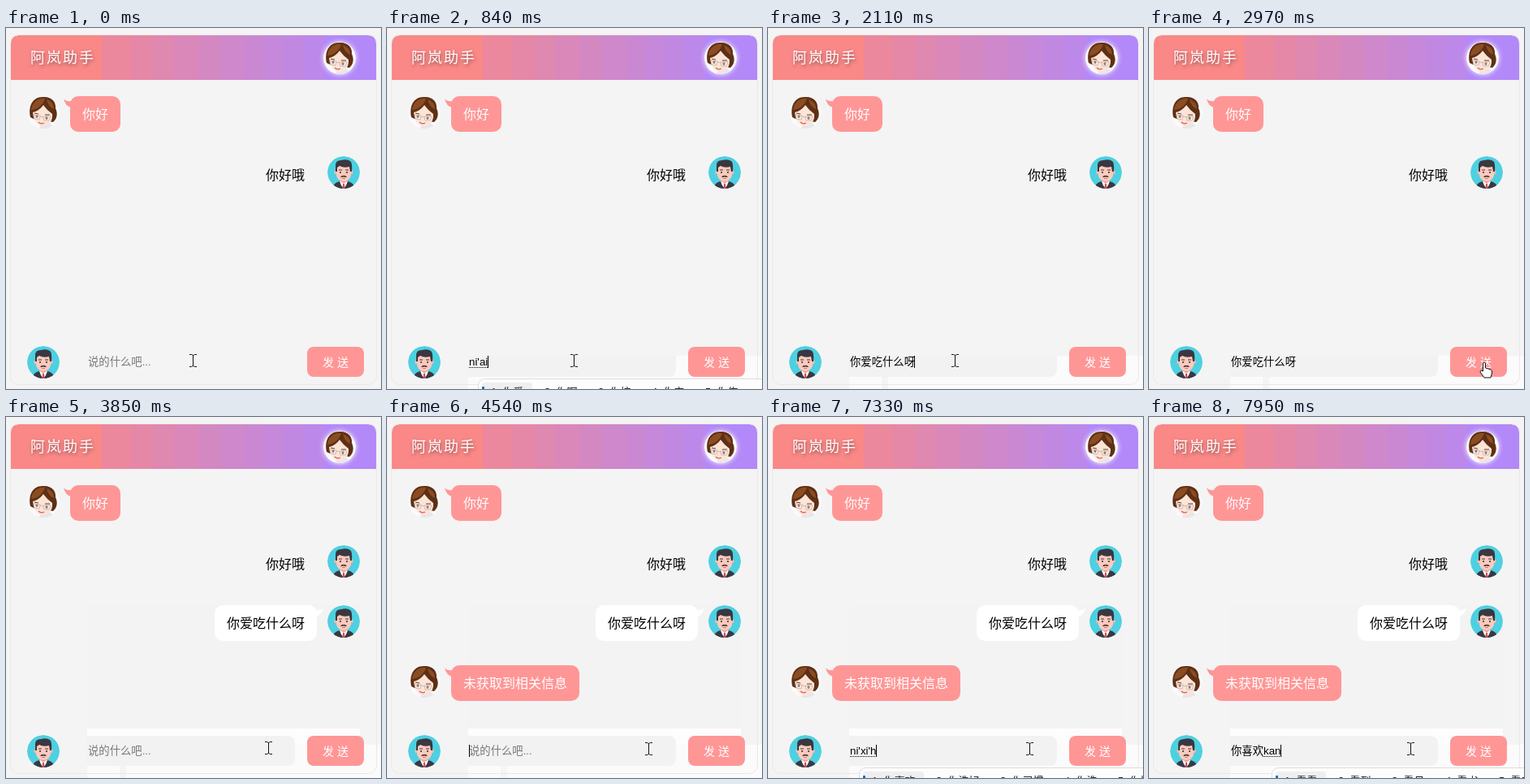
Recreate the animation shown at these times as an HTML page. Size 462 by 445 pixels, loop 8 s.

```html
<!DOCTYPE html>
<html lang="zh-CN">
<head>
<meta charset="utf-8">
<title>聊天</title>
<style>
html, body { margin: 0; width: 100%; height: 100%; overflow: hidden; background: #f4f4f4; }
svg { display: block; width: 462px; height: 445px; }
text { font: 16px "Liberation Sans", "Noto Sans CJK SC", "Noto Sans CJK", sans-serif; white-space: pre; }
.small { font-size: 13.33px; }
.title { font-size: 18px; letter-spacing: 2px; fill: #fff; text-shadow: 1px 2px 4px #0006; }
.glow { filter: drop-shadow(0 0 3px #fff); }
#candidates text { font-size: 13px; fill: #222; }
</style>
</head>
<body>
<svg viewBox="0 0 462 445">
  <defs>
    <clipPath id="round"><circle r="20"/></clipPath>
    <clipPath id="top"><path d="M6 64V19Q6 9 16 9H446Q456 9 456 19V64Z"/></clipPath>
    <g id="woman" clip-path="url(#round)">
      <circle r="20" fill="#fafafa"/>
      <path d="M-6 20L-2 15L8 13L15 20Z" fill="#e6e6ec"/>
      <path d="M-16 6C-19-8-13-19-1-19C10-20 16-13 15-5C18 1 17 8 12 12L7 11L-12 8Z" fill="#5e3015"/>
      <path d="M-13 0Q-5-2 0-9Q5-2 11 2Q12 11 5 15Q1 18-3 17Q-12 13-13 0Z" fill="#fde4d6"/>
      <path d="M-15-3C-14-13-6-18 2-17C-1-8-7-4-15-3ZM4-16Q13-13 13-4Q6-7 4-16Z" fill="#8c4c22"/>
      <path d="M-11 1L-6 2M2 3L8 3" stroke="#6b3a22"/>
      <ellipse cx="-8" cy="5" rx="1.6" ry="2" fill="#4a2c22"/>
      <ellipse cx="4" cy="7" rx="1.6" ry="2" fill="#4a2c22"/>
      <path d="M-12 3L-4 4L-5 9L-11 8ZM0 5L9 5L7 10L1 10ZM-4 5L0 6" fill="#fff6" stroke="#c9b4ae" stroke-width=".9"/>
      <path d="M-6 12Q-3 15 1 13" fill="none" stroke="#d65f62" stroke-width="1.2"/>
    </g>
    <g id="man" clip-path="url(#round)">
      <circle r="20" fill="#4dd0e1"/>
      <path d="M-14 20Q-13 13-5 11H5Q13 13 14 20Z" fill="#3a3843"/>
      <path d="M-5 11H5L3 16L0 20L-3 16Z" fill="#fff"/>
      <path d="M-4 8H4V11L0 14L-4 11Z" fill="#e9a795"/>
      <path d="M-1 14H1L1.5 20H-1.5Z" fill="#c9505a"/>
      <circle cx="-9.5" cy="0" r="2.3" fill="#f4b9aa"/>
      <circle cx="9.5" cy="0" r="2.3" fill="#f4b9aa"/>
      <path d="M-9-8H9V4Q7 11 0 11Q-7 11-9 4Z" fill="#fccabd"/>
      <path d="M-10-1V-9Q-10-15-3-15Q4-17 8-14Q11-12 10-1H8L7-7Q0-5-5-8L-8-6V-1Z" fill="#3a3740"/>
      <path d="M-6-3H-2M2-3H6" stroke="#3a3740"/>
      <circle cx="-4" r="1.1" fill="#3a3740"/><circle cx="4" r="1.1" fill="#3a3740"/>
      <path d="M-4 6Q-2 3 0 4Q2 3 4 6Q2 6 0 5.5Q-2 6-4 6Z" fill="#4a3a40"/>
      <path d="M-2 7.5H2" stroke="#d9776f"/>
    </g>
    <path id="tail" d="M0 3Q3 7 10 6V14Q2 13 0 3Z"/>
  </defs>
  <rect width="462" height="445" fill="#f4f4f4"/>
  <g id="header" clip-path="url(#top)"></g>
  <text class="title" x="30" y="43">阿岚助手</text>
  <use href="#woman" x="411" y="37" class="glow"/>

  <g id="barPatch">
    <path d="M100 404H462V445H100Z" fill="#fbfbfb"/>
    <path d="M100 404H356V420Q356 430 346 430H100Z" fill="#f2f2f2"/>
  </g>
  <path id="strip" d="M140 430H148V445H140Z" fill="#f4f4f4"/>
  <g id="chatPatch">
    <path d="M100 232H436V384H100Z" fill="#f3f3f3"/>
    <path d="M100 384H436V404H100Z" fill="#fdfdfd"/>
    <path d="M100 393H346Q356 393 356 403V405H100Z" fill="#f2f2f2"/>
  </g>
  <rect x="5.5" y="8.5" width="451" height="431" rx="10" fill="none" stroke="#e9e9e9"/>

  <g id="hello"></g>
  <text x="320" y="187">你好哦</text>
  <use href="#man" x="416" y="178"/>
  <g id="question">
    <rect x="257" y="232" width="126" height="44" rx="10" fill="#fff"/>
    <use href="#tail" transform="translate(391 232) scale(-1 1)" fill="#fff"/>
    <text x="272" y="260">你爱吃什么呀</text>
    <use href="#man" x="416" y="252"/>
  </g>
  <g id="reply"></g>

  <use href="#man" x="46" y="412"/>
  <text id="hint" class="small" x="101" y="416" fill="#777">说的什么吧...</text>
  <text id="input" class="small" x="101" y="416"></text>
  <path id="underline" stroke="#000" stroke-dasharray="1 1"/>
  <rect id="caret" y="404" width="1" height="15"/>
  <rect x="371" y="393" width="70" height="37" rx="8" fill="#ff9696"/>
  <text x="390" y="417" fill="#fff" style="font-size:14px;letter-spacing:4px">发送</text>

  <g id="popup">
    <rect x=".5" y="432.5" width="480" height="50" rx="8" fill="#fdfdfd" stroke="#dcdcdc"/>
    <rect id="chosen" x="5" y="437" height="30" rx="4" fill="#efefef"/>
    <rect x="5" y="442" width="3" height="16" rx="1" fill="#0f6cbd"/>
    <g id="candidates"></g>
  </g>
  <path id="beam" fill="none" stroke="#111" d="M-4-7.5H-1.5L.5-6.5L2.5-7.5H5M.5-6.5V6.5M-4 7.5H-1.5L.5 6.5L2.5 7.5H5"/>
  <path id="hand" fill="#fff" stroke="#111" d="M-1.5 1Q0-1 1.5 1V7L8 9Q10 10 9.5 13L8 19H0L-5 12Q-5 9-1.5 11Z"/>
</svg>
<script>
const $ = id => document.getElementById(id);
const LOOP = 8000;

// Header: a banded blend from salmon to violet
const salmon = [249, 136, 135], violet = [179, 136, 248];
const edges = [6, 118, 154, 182, 207, 237, 265, 295, 318, 342, 366, 392, 456];
const middle = i => (edges[i] + edges[i + 1]) / 2;
const lastBand = edges.length - 2;
for (let i = 0; i <= lastBand; i++) {
  const mix = (middle(i) - middle(0)) / (middle(lastBand) - middle(0));
  const rgb = salmon.map((c, k) => Math.round(c + (violet[k] - c) * mix));
  $('header').innerHTML +=
    `<rect x="${edges[i]}" y="9" width="${edges[i + 1] - edges[i]}" height="55" fill="rgb(${rgb})"/>`;
}

function pinkBubble(id, y, words) {
  $(id).innerHTML = `<use href="#woman" x="46" y="${y + 20}"/>
    <rect x="79" y="${y}" width="${30 + 16 * words.length}" height="44" rx="10" fill="#ff9696"/>
    <use href="#tail" x="71" y="${y}" fill="#ff9696"/>
    <text x="94" y="${y + 28}" fill="#fff">${words}</text>`;
}
pinkBubble('hello', 84, '你好');
pinkBubble('reply', 306, '未获取到相关信息');

// Time, committed text, letters being composed
const typing = [
  [0, '', ''], [400, '', 'n'], [460, '', 'ni'], [700, '', "ni'a"], [840, '', "ni'ai"],
  [990, '', "ni'ai'c"], [1050, '', "ni'ai'ch"], [1110, '', "ni'ai'chi"], [1170, '你爱吃', ''],
  [1230, '你爱吃', 's'], [1290, '你爱吃', 'sh'], [1340, '你爱吃', 'she'], [1480, '你爱吃', 'shen'],
  [1600, '你爱吃', "shen'm"], [1740, '你爱吃', "shen'me"], [1920, '你爱吃什么', ''],
  [1980, '你爱吃什么', 'y'], [2050, '你爱吃什么', 'ya'], [2110, '你爱吃什么呀', ''], [3170, '', ''],
  [6700, '', 'n'], [6860, '', 'ni'], [7080, '', "ni'x"], [7140, '', "ni'xi"], [7330, '', "ni'xi'h"],
  [7460, '', "ni'xi'hu"], [7520, '', "ni'xi'hua"], [7580, '', "ni'xi'huan"], [7650, '你喜欢', ''],
  [7830, '你喜欢', 'k'], [7890, '你喜欢', 'ka'], [7950, '你喜欢', 'kan']
];

// Candidate words, picked by the start of the composition
const words = [
  ["ni'xi'h", '你喜欢 你洗好 你习惯 你洗 你惜'], ["ni'x", '你想 你下 你先 你洗 你选'],
  ["ni'ai'", '你爱吃 你爱穿 你爱 你哎 你矮'], ["ni'a", '你爱 你啊 你按 你安 你俺'],
  ['n', '你 年 那 能 呢 南'], ['she', '什么 神奇 甚至 身体 深入'], ['s', '是 说 上 时 谁 三'],
  ['y', '呀 也 一 有 要 呀'], ['ka', '看看 看到 看见 看书 看来'], ['k', '可以 看到 开始 快点 课程']
];

// Time, x, y of the pointer
const pointer = [
  [0, 230, 410], [2590, 240, 411], [2650, 265, 414], [2710, 305, 419], [2770, 345, 423],
  [2830, 374, 424], [2900, 398, 419], [2970, 413, 412], [3660, 405, 412], [3720, 385, 411],
  [3790, 352, 410], [3850, 323, 408], [4340, 322, 409]
];
const caretFlips = [[0, 0], [70, 1], [2530, 0], [4540, 1], [5090, 0], [5570, 1], [6110, 0], [6620, 1]];

const at = (list, t) => list.findLast(item => item[0] <= t);
const show = (id, on) => $(id).setAttribute('display', on ? 'inline' : 'none');
const move = (id, x, y) => $(id).setAttribute('transform', `translate(${x} ${y})`);

function drawPopup(start, letters) {
  show('popup', letters);
  if (!letters) return;
  move('popup', Math.round(start + 11), 0);
  const list = words.find(([key]) => letters.startsWith(key))[1].split(' ');
  let x = 16;
  $('candidates').innerHTML = list.map((word, i) => {
    const item = `<text x="${x}" y="453">${i + 1}  ${word}</text>`;
    x += 40 + 13 * word.length;
    return item;
  }).join('');
  $('chosen').setAttribute('width', 36 + 13 * list[0].length);
}

// Right edge of the input text, in whole pixels
function inputEnd(words) {
  $('input').textContent = words;
  return 101 + (words ? Math.floor($('input').getComputedTextLength()) : 0);
}

let last;
function drawInput(step) {
  if (step === last) return;
  last = step;
  const [, done, letters] = step;
  const start = inputEnd(done), end = inputEnd(done + letters);
  show('hint', !(done + letters));
  show('underline', letters);
  $('underline').setAttribute('d', `M${start} 418.5H${end}`);
  $('caret').setAttribute('x', end);
  drawPopup(start, letters);
}

function render(t) {
  drawInput(at(typing, t));
  show('caret', at(caretFlips, t)[1]);
  show('barPatch', t >= 400);
  show('strip', t >= 1170 && t < 6700);
  show('chatPatch', t >= 3170);
  show('question', t >= 3170);
  show('reply', t >= 3970);
  const [, x, y] = at(pointer, t), onButton = x > 371;
  show('beam', !onButton);
  show('hand', onButton);
  move(onButton ? 'hand' : 'beam', x, y);
}

function frame() {
  render(performance.now() % LOOP);
  requestAnimationFrame(frame);
}
frame();
</script>
</body>
</html>
```
